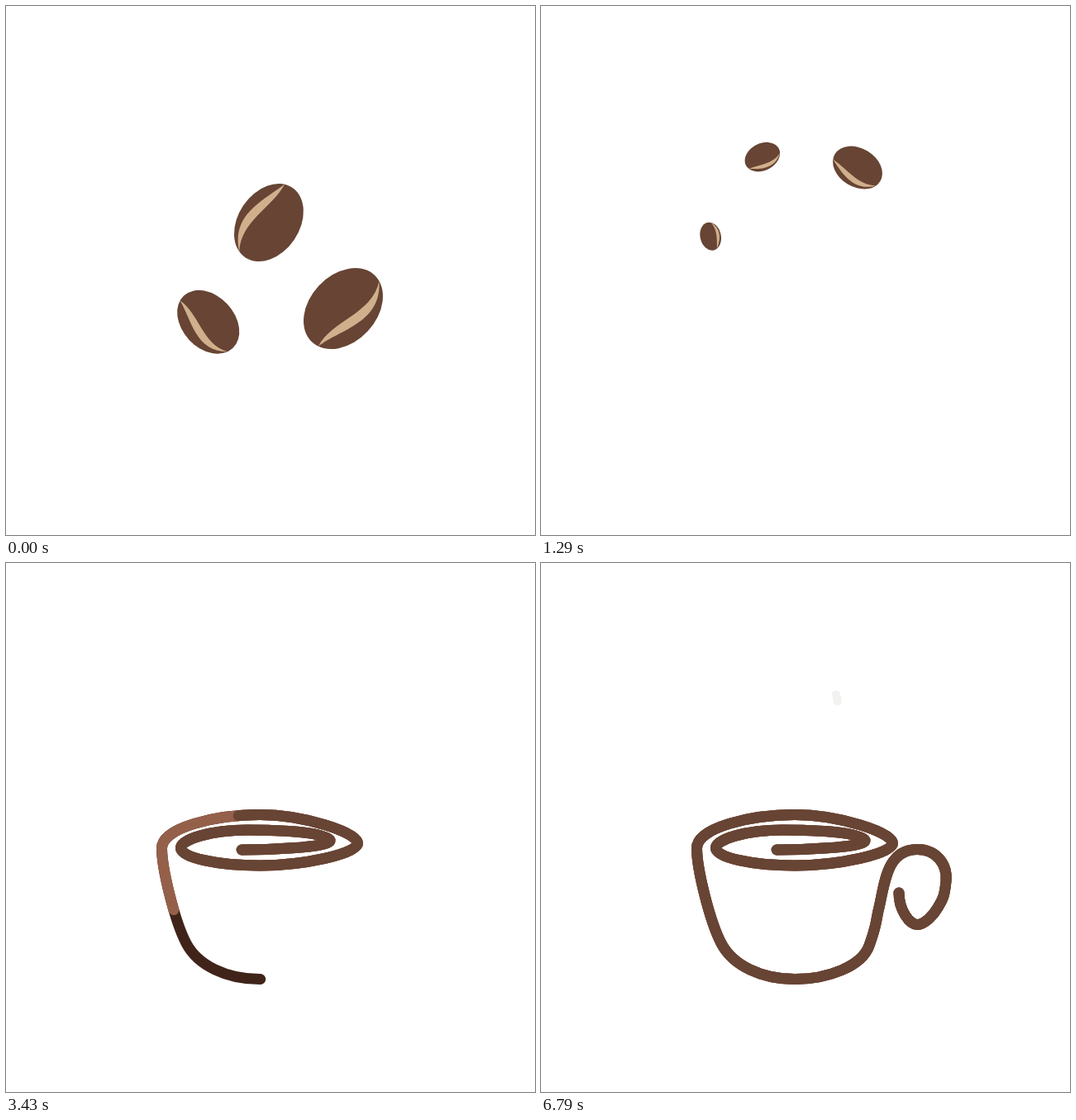
These frames come from a looping animation (640 by 640 pixels, 8000 ms). An HTML page with a canvas:

```html
<!DOCTYPE html>
<html>
<head>
<meta charset="utf-8">
<title>Coffee</title>
<style>
  html, body { margin: 0; height: 100%; overflow: hidden; background: #fff; }
  canvas { display: block; width: 100vw; height: 100vh; }
</style>
</head>
<body>
<canvas id="stage" width="640" height="640"></canvas>
<script>
const ctx = document.getElementById('stage').getContext('2d');
const LOOP = 8000, LAST = 6790, FPS = 14;
const BROWN = '#674434', LIGHT = '#95604a', DARK = '#40241a', CREASE = '#d0b08c';
const CENTER = [318, 285], DOT = 6.5;

const clamp = (v, lo, hi) => Math.min(hi, Math.max(lo, v));
const mix = (a, b, k) => a + (b - a) * k;
const ramp = (t, [a, b]) => clamp((t - a) / (b - a), 0, 1);
const radians = deg => deg * Math.PI / 180;

function makePath(d) {
  const el = document.createElementNS('http://www.w3.org/2000/svg', 'path');
  el.setAttribute('d', d);
  return el;
}
const measure = d => makePath(d).getTotalLength();

// The whole cup is one line
const segments = [
  'M214 228',
  'C206 258 209 303 232 327', 'C245 341 265 347 285 347',
  'S393 345 392 335.5', 'S335 323 292 323', 'S211.5 334 211.5 345',
  'S255 366 307 366', 'S425.5 352 425.5 339', 'S360 304.5 307 304.5',
  'S188.5 320 188.5 345', 'S204 433 218 460', 'S267 503.5 307 503.5',
  'S388 488 397 463', 'S404 440 408 421', 'C416 389 417 347 455 346.5',
  'C478 346.5 492 364 490 385', 'S485 408 480 417',
  'S464 437.5 455 437.5', 'S433 420 433 399'
];
const cupEl = makePath(segments.join(''));
const cup = new Path2D(segments.join(''));
const stops = segments.map((_, i) => i ? measure(segments.slice(0, i + 1).join('')) : 0);

// Turns a position counted in segments into a length along the cup
function lengthAt(pos) {
  const i = Math.min(Math.floor(pos), stops.length - 2);
  return mix(stops[i], stops[i + 1], pos - i);
}
const track = keys => keys.map(([t, pos]) => [t, lengthAt(pos)]);

// Smooth curve through keys [time, value]
function sample(keys, t) {
  const last = keys.length - 1;
  if (t <= keys[0][0]) return keys[0][1];
  if (t >= keys[last][0]) return keys[last][1];
  const i = keys.findIndex(k => k[0] > t) - 1;
  const a = keys[i], b = keys[i + 1], span = b[0] - a[0];
  const slope = (p, q) => (q[1] - p[1]) / (q[0] - p[0]) * span;
  const m = slope(keys[Math.max(i - 1, 0)], b), n = slope(a, keys[Math.min(i + 2, last)]);
  const u = (t - a[0]) / span, w = 1 - u;
  return a[1] * w * w * (1 + 2 * u) + b[1] * u * u * (3 - 2 * u) + m * u * w * w - n * u * u * w;
}

// Parabola through three poses
const POSE_TIMES = [0, 790, 1290];
function through([p, q, r], t) {
  const [a, b, c] = POSE_TIMES;
  const first = (q - p) / (b - a), second = ((r - q) / (c - b) - first) / (c - a);
  return p + (t - a) * (first + (t - b) * second);
}

// Each bean orbits the center, shrinks to a dot and goes on as a strand of the cup line
const beans = [
  { color: DARK, head: [[1390, 1], [2710, 7.08], [3430, 11], [4210, 16], [4440, 18]],
    angle: [318, 403.1, 536.8], radius: [121.1, 124, 113], size: [55.4, 44.3, 17.2],
    heading: [-47, -133, -283], roll: [.56, -.1, -.85] },
  { color: LIGHT, head: [[1500, .5], [2710, 6.32], [4210, 15], [4640, 18]],
    angle: [233, 356.6, 476.1], radius: [121.8, 121.6, 114], size: [43.4, 37.3, 22.4],
    heading: [47, -88, -207], roll: [.58, .08, -.8] },
  { color: BROWN, head: [[1720, 0], [2710, 4], [4210, 13], [5360, 17.7], [5560, 18]],
    angle: [90.2, 318, 414], radius: [23, 129.6, 110.6], size: [50.9, 45, 32],
    heading: [124, -48.6, -149], roll: [.67, .1, -.74] }
];
for (const bean of beans) {
  bean.head = track(bean.head);
  [bean.born, bean.from] = bean.head[0];
  bean.goal = cupEl.getPointAtLength(bean.from);
}
const tail = track([[1720, 0], [2710, 1], [3290, 2]]);

function drawBean(bean, t) {
  if (t >= bean.born) return;
  const settle = ramp(t, [POSE_TIMES[2], bean.born]) ** 2;
  const angle = radians(through(bean.angle, t)), radius = through(bean.radius, t);
  const x = mix(CENTER[0] + radius * Math.cos(angle), bean.goal.x, settle);
  const y = mix(CENTER[1] - radius * Math.sin(angle), bean.goal.y, settle);
  const a = mix(Math.max(through(bean.size, t), DOT), DOT, settle), b = a * .73;
  const roll = clamp(through(bean.roll, t), -1, 1);
  const tipV = .4 * roll * b, tipU = a * Math.sqrt(1 - .16 * roll * roll);
  const bend = .55 * (1 - roll * roll);
  const ctrl = (side, edge) => [side * .35 * a, b * (roll + side * bend + edge * .19)];

  ctx.save();
  ctx.translate(x, y);
  ctx.rotate(radians(through(bean.heading, t)));
  ctx.beginPath();
  ctx.ellipse(0, 0, a, b, 0, 0, 2 * Math.PI);
  ctx.fillStyle = BROWN;
  ctx.fill();
  ctx.clip();
  ctx.beginPath();
  ctx.moveTo(-tipU, tipV);
  ctx.bezierCurveTo(...ctrl(-1, -1), ...ctrl(1, -1), tipU, tipV);
  ctx.bezierCurveTo(...ctrl(1, 1), ...ctrl(-1, 1), -tipU, tipV);
  ctx.fillStyle = CREASE;
  ctx.fill();
  ctx.restore();
}

function drawPart(path, from, to, width, color) {
  if (to <= from) return;
  ctx.lineWidth = width;
  ctx.strokeStyle = color;
  ctx.setLineDash([to - from, 9999]);
  ctx.lineDashOffset = -from;
  ctx.stroke(path);
}

function drawStrand({ color, head, born, from }, t) {
  if (t < born) return;
  const end = Math.min(sample(head, t), cupEl.getTotalLength());
  drawPart(cup, Math.max(sample(tail, t), from), end, 2 * DOT, color);
}

const steam = [
  ['M272 273C258 230 297 214 282 174', [4560, 5395], [5400, 6250]],
  ['M299 285C293 262 294 243 304 221S328 175 316 129', [4880, 6070], [5700, 6550]],
  ['M321 273C314 220 372 215 357 159', [5200, 6090], [6000, 6850]]
].map(([d, grow, fade]) => ({ path: new Path2D(d), length: measure(d), grow, fade }));

function drawSteam({ path, length, grow, fade }, t) {
  const gone = ramp(t, fade);
  ctx.globalAlpha = ramp(t, [grow[0], grow[0] + 190]) * (1 - gone);
  drawPart(path, gone * length, ramp(t, grow) * length, 10, BROWN);
  ctx.globalAlpha = 1;
}

ctx.lineCap = 'round';
ctx.lineJoin = 'round';

function draw(now) {
  const step = Math.floor((now % LOOP) * FPS / 1000 + .08);
  const t = Math.min(Math.round(step * 100 / FPS) * 10, LAST);
  ctx.fillStyle = '#fff';
  ctx.fillRect(0, 0, 640, 640);
  beans.forEach(bean => drawStrand(bean, t));
  beans.forEach(bean => drawBean(bean, t));
  steam.forEach(wisp => drawSteam(wisp, t));
}

const begin = performance.now();
function tick() {
  draw(performance.now() - begin);
  requestAnimationFrame(tick);
}
tick();
</script>
</body>
</html>
```
